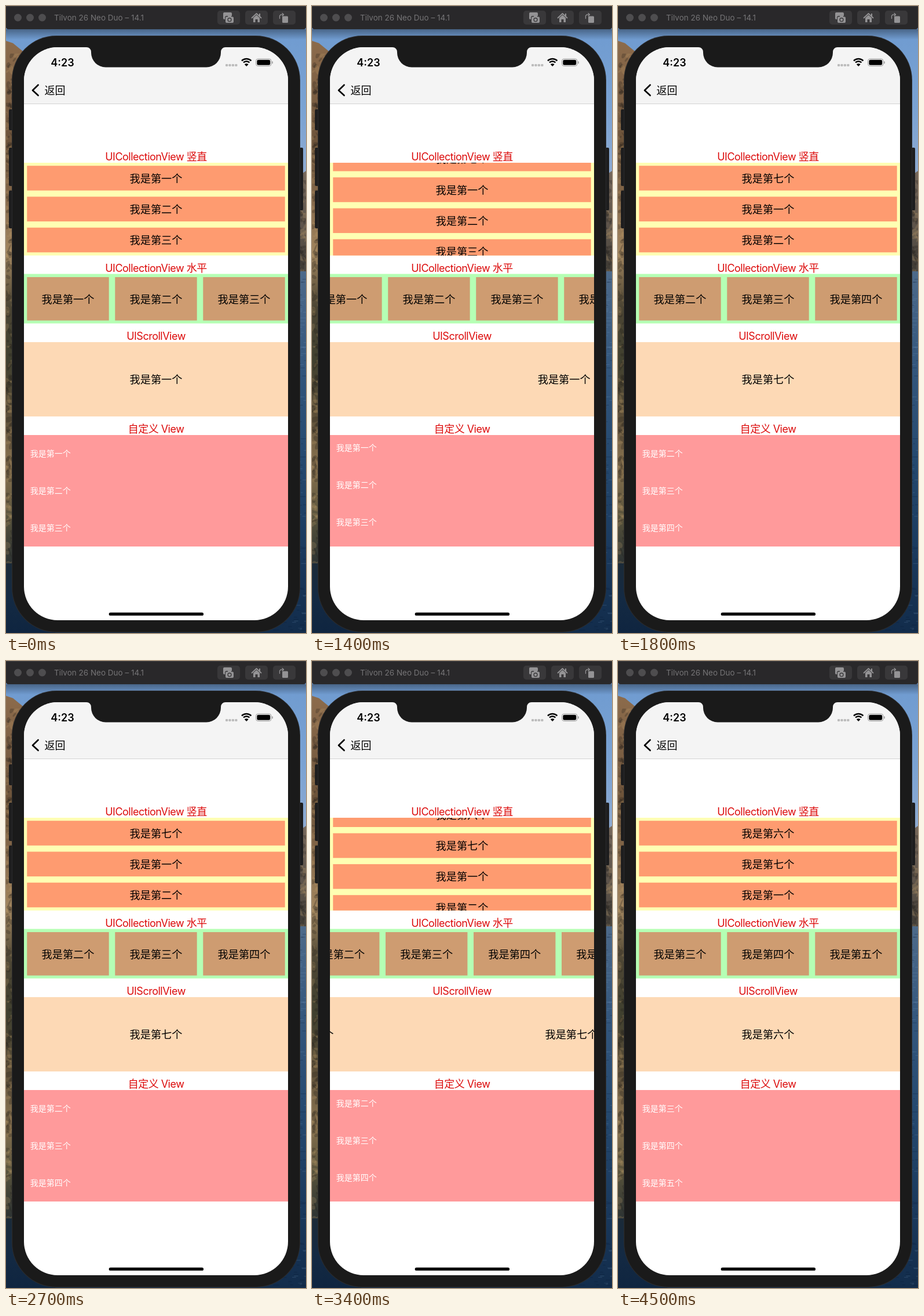
An HTML page with a canvas for the animation above (4.6 s loop, 518x1080 px).

```html
<!DOCTYPE html>
<html lang="zh">
<head>
<meta charset="utf-8">
<title>Scrolling lists</title>
<style>
html, body { margin: 0; width: 100%; height: 100%; overflow: hidden; background: #29282a; }
canvas { display: block; width: 518px; height: 1080px; }
</style>
</head>
<body>
<canvas id="stage" width="518" height="1080"></canvas>
<script>
const W = 518, H = 1080, LOOP = 4600, STEP = 100;
const CJK = '"Noto Sans CJK SC", "Noto Sans CJK", sans-serif';
const LATIN = 'Inter, ' + CJK;
const NUMERALS = '一二三四五六七';
const screen = { x: 31, y: 71, w: 456, h: 987 };

const stage = document.getElementById('stage').getContext('2d');
const backdrop = document.createElement('canvas');
backdrop.width = W;
backdrop.height = H;
let g = backdrop.getContext('2d');

function rect(x, y, w, h, color) {
  g.fillStyle = color;
  g.fillRect(x, y, w, h);
}

function round(x, y, w, h, r, color) {
  g.beginPath();
  g.roundRect(x, y, w, h, r);
  g.fillStyle = color;
  g.fill();
}

function disc(x, y, r, color) {
  g.beginPath();
  g.arc(x, y, r, 0, Math.PI * 2);
  g.fillStyle = color;
  g.fill();
}

function polygon(points, color) {
  g.beginPath();
  points.forEach(([x, y]) => g.lineTo(x, y));
  g.fillStyle = color;
  g.fill();
}

function line(points, width, color) {
  g.beginPath();
  points.forEach(([x, y]) => g.lineTo(x, y));
  g.lineWidth = width;
  g.strokeStyle = color;
  g.lineCap = g.lineJoin = 'round';
  g.stroke();
}

// y is the optical middle of the line of text
function text(str, x, y, size, color, { family = CJK, weight = 400, align = 'center', spacing = 0 } = {}) {
  g.font = `${weight} ${size}px ${family}`;
  g.letterSpacing = spacing + 'px';
  g.textAlign = align;
  g.fillStyle = color;
  g.fillText(str, x, y + size * 0.37);
}

function gradient(y0, y1, colors) {
  const fill = g.createLinearGradient(0, y0, 0, y1);
  colors.forEach((c, i) => fill.addColorStop(i / (colors.length - 1), c));
  return fill;
}

function clipped(x, y, w, h, draw) {
  g.save();
  g.beginPath();
  g.rect(x, y, w, h);
  g.clip();
  draw();
  g.restore();
}

function randomizer(seed) {
  return () => (seed = (seed * 16807) % 2147483647) / 2147483647;
}

function mottle(rand, count, x, y, w, h) {
  clipped(x, y, w, h, () => {
    for (let i = 0; i < count; i++) {
      g.beginPath();
      g.ellipse(x + rand() * w, y + rand() * h, 1 + rand() * 4, 1 + rand() * 8, rand() * 3, 0, 7);
      g.fillStyle = rand() < 0.55 ? 'rgba(30,27,22,.25)' : 'rgba(200,164,112,.2)';
      g.fill();
    }
  });
}

function drawWallpaper() {
  const rand = randomizer(417);
  rect(0, 0, W, 460, gradient(40, 460, ['#6f9bd0', '#7ba3d3', '#93acd0', '#aeb4c6']));
  polygon([[495, 300], [W, 284], [W, 458], [495, 458]], gradient(284, 458, ['#75675a', '#5f554b', '#4b463f']));
  mottle(rand, 70, 495, 300, 23, 158);

  rect(0, 457, W, H - 457, gradient(457, H, ['#4d6a8a', '#34577d', '#264a70', '#1b3b5f', '#122c4b']));
  for (let i = 0; i < 420; i++) {
    const y = 465 + rand() * 610;
    rect(440 + rand() * 75, y, 3 + rand() * 8, 1, rand() < 0.5 ? 'rgba(130,165,200,.22)' : 'rgba(5,20,45,.28)');
  }

  polygon([[0, 60], [12, 64], [34, 82], [85, 130], [85, 975], [0, 975]],
    gradient(60, 975, ['#8c6b4b', '#7d6044', '#6b5239', '#86694a', '#a1855e', '#4d4634',
      '#40402f', '#5a4d37', '#8a7350', '#56513b', '#242d31']));
  mottle(rand, 480, 0, 82, 32, 890);
  rect(0, 960, 85, 120, gradient(960, 1080, ['#1b2a38', '#142a43', '#0f2540']));
  rect(0, 40, W, 18, gradient(40, 58, ['rgba(0,0,0,.35)', 'rgba(0,0,0,0)']));
}

function drawToolbar() {
  const icon = '#949395', button = '#39383a';
  round(0, 0, W, 40, [0, 0, 4, 4], '#29282a');
  rect(0, 0, W, 1, '#3c3b3d');
  [20.5, 41.5, 62.5].forEach(x => disc(x, 20, 6.5, '#4e4d4f'));
  text('Tilvon 26 Neo Duo – 14.1', 83, 20.5, 13.5, '#757476', { family: LATIN, align: 'left' });
  [365, 413, 461].forEach(x => round(x, 8, 39, 24, 5, button));

  round(375, 11, 15, 12, 2, icon);
  round(378, 17, 16, 13, 3, button);
  round(379, 18.5, 14, 10.5, 2, icon);
  round(383, 16.5, 6, 4, 1, icon);
  disc(386, 23.7, 3.6, button);
  disc(386, 23.7, 2.3, icon);

  line([[424.5, 20.5], [432.5, 13], [440.5, 20.5]], 1.8, icon);
  rect(437, 13, 2, 5, icon);
  polygon([[427, 20.5], [432.5, 15.5], [438, 20.5], [438, 28], [434.5, 28], [434.5, 23],
    [430.5, 23], [430.5, 28], [427, 28]], icon);

  round(477, 17.5, 10, 11.5, 1.5, icon);
  line([[472.5, 21.5], [472.5, 17], [474.5, 14.8], [479, 14.8]], 1.3, icon);
  line([[477, 12.5], [479.5, 14.8], [477, 17]], 1.3, icon);
}

function drawPhone() {
  [[178, 36], [244, 66], [318, 65]].forEach(([y, h]) => round(5, y, 9, h, 2, '#1d1d1e'));
  round(504, 244, 9, 108, 2, '#1d1d1e');
  round(10, 51, 498, 1028, 77, '#2c2c2d');
  round(11, 52, 496, 1026, 76, '#1a1a1a');

  g.save();
  g.beginPath();
  g.roundRect(screen.x, screen.y, screen.w, screen.h, 58);
  g.clip();
  rect(screen.x, screen.y, screen.w, screen.h, '#fff');
  rect(screen.x, screen.y, screen.w, 97, '#f4f4f4');
  rect(screen.x, 168, screen.w, 1, '#d2d2d2');
  g.restore();

  g.beginPath();
  g.moveTo(139, 70);
  g.lineTo(139, 71);
  g.arcTo(147, 71, 147, 79, 8);
  g.arcTo(147, 105.5, 173, 105.5, 25);
  g.arcTo(371, 105.5, 371, 80, 25);
  g.arcTo(371, 71, 379, 71, 8);
  g.lineTo(379, 70);
  g.fillStyle = '#1a1a1a';
  g.fill();
  round(177.7, 1044.7, 163.4, 5.4, 2.7, '#000');
}

function drawStatus() {
  text('4:23', 97.5, 97, 18, '#000', { family: LATIN, weight: 600 });
  for (let i = 0; i < 4; i++) round(379 + i * 5.4, 100, 4.2, 4, 1.3, '#bcbcbc');

  g.lineCap = 'butt';
  g.strokeStyle = '#000';
  [11.6, 7.3].forEach(r => {
    g.beginPath();
    g.arc(415.2, 102.6, r, -Math.PI * 0.75, -Math.PI * 0.25);
    g.lineWidth = 2.5;
    g.stroke();
  });
  g.beginPath();
  g.moveTo(415.2, 104);
  g.arc(415.2, 104, 4.8, -Math.PI * 0.75, -Math.PI * 0.25);
  g.fillStyle = '#000';
  g.fill();

  g.beginPath();
  g.roundRect(431.5, 91, 26.5, 12.5, 3.8);
  g.lineWidth = 1;
  g.strokeStyle = '#9c9c9c';
  g.stroke();
  round(433.3, 92.8, 22.9, 8.9, 2.3, '#000');
  round(459.3, 95, 1.6, 4.5, [0, 1.5, 1.5, 0], '#9c9c9c');

  line([[55.5, 136], [46, 145.2], [55.5, 154]], 2.7, '#000');
  text('返回', 66.5, 145, 18, '#000', { align: 'left' });
}

function drawTitles() {
  [['UICollectionView 竖直', 259], ['UICollectionView 水平', 451], ['UIScrollView', 568.5], ['自定义 View', 728.5]]
    .forEach(([str, y]) => text(str, 259, y, 18, '#dc0b0b', { family: LATIN, spacing: -0.5 }));
}

function easeInOut(u) {
  if (u <= 0) return 0;
  if (u >= 1) return 1;
  let lo = 0, hi = 1;
  for (let i = 0; i < 24; i++) {
    const s = (lo + hi) / 2, r = 1 - s;
    const x = 3 * r * r * s * 0.42 + 3 * r * s * s * 0.58 + s * s * s;
    if (x < u) lo = s; else hi = s;
  }
  return lo * lo * (3 - 2 * lo);
}

const progress = (t, starts, duration) =>
  starts.reduce((sum, start) => sum + easeInOut((t - start) / duration), 0);

const label = i => `我是第${NUMERALS[(i + 7) % 7]}个`;

function drawVertical(p) {
  clipped(31, 270, 456, 159.7, () => {
    rect(31, 270, 456, 160, '#feffb3');
    for (let i = -3; i < 4; i++) {
      const y = 275.2 + 53.27 * (i + p);
      rect(36.3, y, 445.4, 42.6, '#fe9b70');
      text(label(i), 259, y + 21.6, 18.2, '#000');
    }
  });
}

function drawHorizontal(p) {
  clipped(31, 461.6, 456, 85.2, () => {
    rect(31, 461, 456, 86, '#b5ffb4');
    for (let i = 0; i < 6; i++) {
      const x = 36.3 + 152 * (i - p);
      rect(x, 467, 141.4, 74.7, '#ce9c71');
      text(label(i), x + 70.7, 504.8, 18.2, '#000');
    }
  });
}

function drawPages(p) {
  clipped(31, 579, 456, 128, () => {
    rect(31, 579, 456, 128, '#fdd9b5');
    for (let i = -3; i < 2; i++) text(label(i), 259 + 456 * (i + p), 643, 18.2, '#000');
  });
}

function drawTicker(p) {
  clipped(31, 739, 456, 192, () => {
    rect(31, 739, 456, 192, '#ff9a9b');
    for (let i = 0; i < 6; i++) text(label(i), 41.7, 771 + 64 * (i - p), 14, '#fff', { align: 'left' });
  });
}

function drawBackdrop() {
  drawWallpaper();
  drawToolbar();
  drawPhone();
  drawStatus();
  drawTitles();
}

function frame(now) {
  const t = Math.floor((now % LOOP) / STEP) * STEP;
  const scroll = progress(t, [1272, 3267], 300);
  g.drawImage(backdrop, 0, 0);
  drawVertical(scroll);
  drawHorizontal(scroll);
  drawPages(progress(t, [1270, 3265], 300));
  drawTicker(progress(t, [1255, 3258], 530));
}

drawBackdrop();
g = stage;
let origin;
function tick(now) {
  origin ??= now;
  frame(now - origin);
  requestAnimationFrame(tick);
}
frame(0);
requestAnimationFrame(tick);
</script>
</body>
</html>
```
